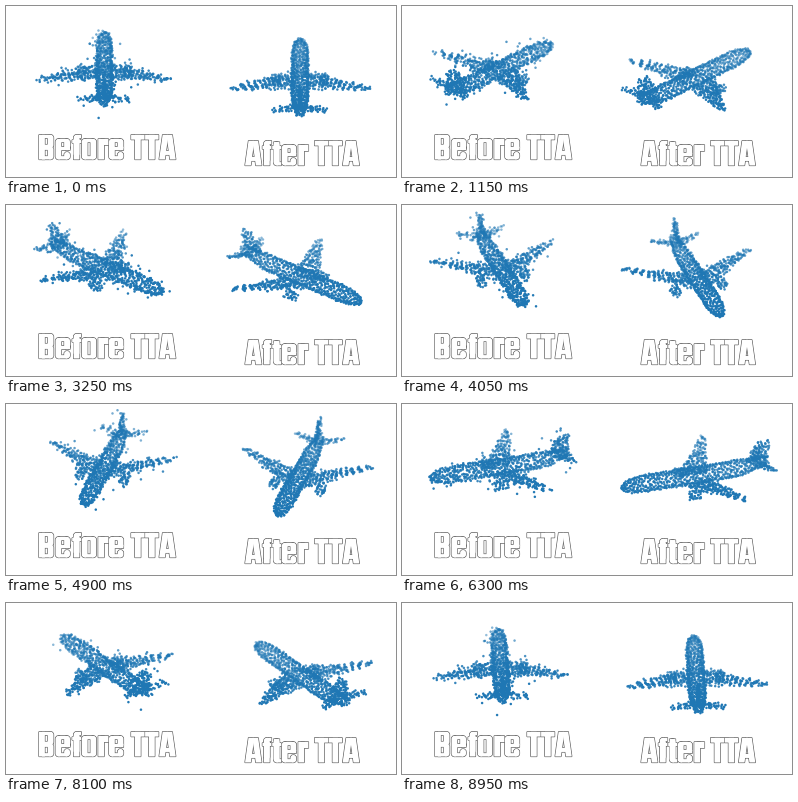
These frames come from a looping animation (390 by 171 pixels, 9000 ms). A matplotlib script:

```python
import numpy as np
import matplotlib.pyplot as plt
from matplotlib.animation import FuncAnimation
from matplotlib.patches import FancyBboxPatch, Polygon

W, H, DPI = 390, 171, 100
FRAMES, INTERVAL = 180, 50
PX = 72 / DPI
BLUE = (31 / 255, 119 / 255, 180 / 255)
ELEV = np.radians(30)
CAMERA = 1500
LENGTH, RADIUS = 77, 8

rng = np.random.default_rng(7)


# ---------- aircraft: columns are forward, right, up ----------

def spread(n):
    """Evenly spread points of the unit square."""
    k = np.arange(n) + rng.integers(1000)
    return (k * 0.7548777) % 1, (k * 0.5698403) % 1


def fuselage(n):
    s, t = spread(n)
    f = LENGTH * (2 * s ** 0.95 - 1)
    nose = np.sqrt(1 - np.clip((f - 50) / 27, 0, 1) ** 2)
    tail = 1 - 0.55 * np.clip((-45 - f) / 32, 0, 1)
    rad = RADIUS * nose * tail
    a = 2 * np.pi * t
    return np.c_[f, rad * np.cos(a), rad * np.sin(a) + RADIUS * (1 - tail) - (1 - nose)]


def plate(n, root, tip, start, end, thick):
    """Tapered plate between two (leading, trailing) edges."""
    s, t = spread(n)
    k = (tip[0] - tip[1]) / (root[0] - root[1])
    v = (1 - np.sqrt(1 - s * (1 - k * k))) / (1 - k)

    def mix(a, b):
        return a + (b - a) * v

    lead, trail = mix(root[0], tip[0]), mix(root[1], tip[1])
    flat = rng.choice([-1, 1], n) * thick * (1 - 0.6 * v)
    return trail + (lead - trail) * t, mix(start[0], end[0]), mix(start[1], end[1]), flat


def wing(n, sign, *shape):
    f, out, up, flat = plate(n, *shape)
    return np.c_[f, sign * out, up + flat]


def fin(n):
    f, _, up, flat = plate(n, (-51, -76), (-65, -78), (0, 5), (0, 27), 0.8)
    return np.c_[f, flat, up]


def engine(n, sign):
    s, t = spread(n)
    a = 2 * np.pi * t
    return np.c_[1 + 14 * s, sign * 24 + 4 * np.cos(a), 4 * np.sin(a) - 8]


def plane(jitter):
    parts = [fuselage(620), fin(70)]
    for sign in (-1, 1):
        parts += [
            wing(185, sign, (18, -14), (-27, -33), (6, -4), (69, 4), 1.6),
            wing(38, sign, (-57, -71), (-71, -77), (3, 4), (26, 6), 0.7),
            engine(34, sign),
        ]
    pts = np.vstack(parts)
    return pts + rng.normal(0, jitter, pts.shape)


def noisy_plane():
    pts = plane(0.8) * 0.95
    stray = rng.choice(len(pts), 110, replace=False)
    pts[stray] += np.clip(rng.normal(0, 6, (len(stray), 3)), -14, 14)
    return pts


def project(pts, turn, cx, cy):
    f, r, u = pts.T
    depth = f * np.cos(turn) - r * np.sin(turn)
    x = f * np.sin(turn) + r * np.cos(turn)
    y = depth * np.sin(ELEV) + u * np.cos(ELEV)
    away = depth * np.cos(ELEV) - u * np.sin(ELEV)
    scale = 1 / (1 + away / CAMERA)
    order = np.argsort(-away)
    fade = 0.7 * (away - away.min()) / np.ptp(away)
    # face and edge of each dot overlap, which deepens the shade
    alpha = 1 - fade ** 1.8
    return np.c_[cx + x * scale, cy - y * scale][order], alpha[order]


# ---------- outlined heavy lettering built from stems and bars ----------

CAP, LOW = 24, 20
STEM, SLIT, THIN = 5.7, 2.7, 3.3
RIGHT = STEM + SLIT
WIDE = RIGHT + STEM
ROUND = STEM / 2


def stem(x, y0, y1, r=0, lean=0):
    return x, y0, x + STEM, y1, r, lean


def bar(y, x0=ROUND, x1=WIDE - ROUND, h=THIN):
    return x0, y, x1, y + h, 0, 0


def bowl(y0, y1):
    return [stem(RIGHT, y0, y1, ROUND), bar(y0), bar(y1 - THIN)]


def hooked(top, bend):
    """Stem with a crossbar at low-letter height and a bent end."""
    straight = stem(1.6, 0, LOW) if bend else stem(1.6, ROUND, top)
    y = top - THIN if bend else 0
    return [straight, stem(1.6, 0 if not bend else ROUND, top, ROUND),
            bar(LOW - 4, 0.2, 9, 3), bar(y, 1.6 + ROUND, 9)]


LEFT = stem(0, 0, LOW, ROUND)
GLYPHS = {
    "B": [stem(0, 0, CAP)] + bowl(0, CAP / 2 + 0.6) + bowl(CAP / 2 - 0.8, CAP),
    "e": [LEFT, stem(RIGHT, 9, LOW, ROUND), stem(RIGHT, 0, 7.3, ROUND),
          bar(0), bar(LOW - THIN), bar(9, x1=WIDE)],
    "o": [LEFT] + bowl(0, LOW),
    "f": hooked(CAP, True),
    "t": hooked(CAP - 1.2, False),
    "r": [stem(0, 0, LOW), bar(LOW - 6, x1=STEM + 4.2, h=6)],
    "T": [stem(3.7, 0, CAP), bar(CAP - 4.7, 0, 13.1, 4.7)],
    "A": [stem(0, 0, CAP, lean=3.4), stem(10.5, 0, CAP, lean=-3.4), bar(4.4, 3, 13, 4)],
}


def piece(part, x, base, size, **style):
    x0, y0, x1, y1, r, lean = part
    if lean:
        corners = np.array([(x0, y0), (x0 + lean, y1), (x1 + lean, y1), (x1, y0)])
        return Polygon(corners * (size, -size) + (x, base), **style)
    return FancyBboxPatch((x + x0 * size, base - y1 * size), (x1 - x0) * size,
                          (y1 - y0) * size,
                          boxstyle=f"round,pad=0,rounding_size={r * size}", **style)


def write(text, x, base, size=1.03):
    for ch in text:
        if ch == " ":
            x += 5.5 * size
            continue
        for part in GLYPHS[ch]:
            ax.add_patch(piece(part, x, base, size, fc="#555", ec="#555",
                               lw=1.2 * PX, zorder=1))
            ax.add_patch(piece(part, x, base, size, fc="white", lw=0, zorder=2))
        gap = 1.9 if ch in "Beo" else 0.5
        x += (max(part[2] for part in GLYPHS[ch]) + gap) * size


# ---------- scene ----------

fig = plt.figure(figsize=(W / DPI, H / DPI), dpi=DPI, facecolor="white")
ax = fig.add_axes([0, 0, 1, 1])
ax.set(xlim=(0, W), ylim=(H, 0))
ax.axis("off")

write("Before TTA", 33, 153.5)
write("After TTA", 239, 159.5)

clouds = []
for pts, cx, cy in ((noisy_plane(), 98.5, 62.5), (plane(0.5), 294, 71)):
    dots = ax.scatter(pts[:, 0], pts[:, 1], s=(2.5 * PX) ** 2, linewidths=0, zorder=3)
    clouds.append((dots, pts, cx, cy))


def draw(i):
    turn = 2 * np.pi * i / FRAMES
    for dots, pts, cx, cy in clouds:
        xy, alpha = project(pts, turn, cx, cy)
        dots.set_offsets(xy)
        dots.set_facecolors(np.c_[np.tile(BLUE, (len(xy), 1)), alpha])
    return [c[0] for c in clouds]


anim = FuncAnimation(fig, draw, frames=FRAMES, interval=INTERVAL,
                     repeat=True, repeat_delay=0)
plt.show()
```
